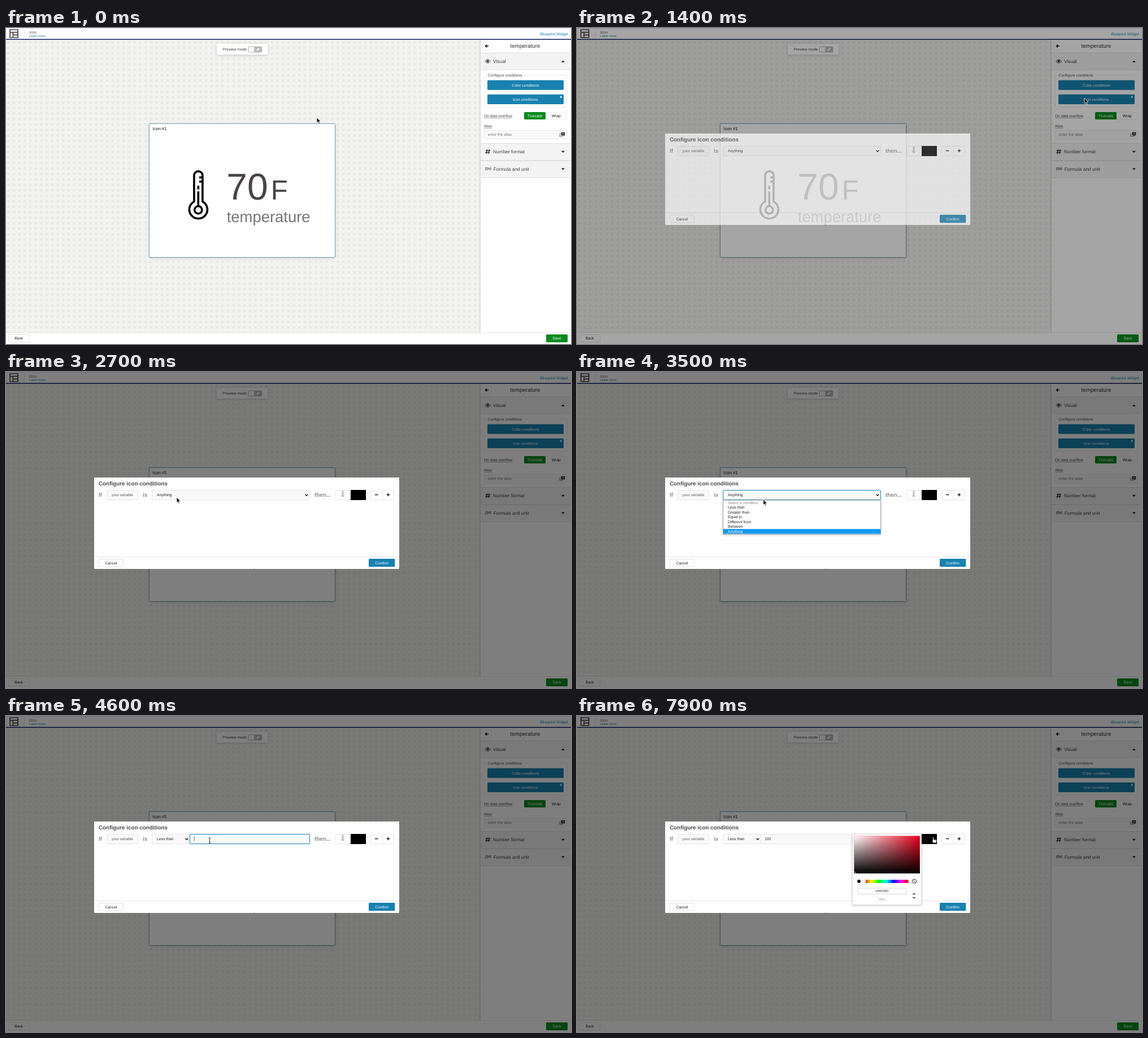
These frames come from a looping animation (1000x560 px, 8 s). An HTML page:

```html
<!DOCTYPE html>
<html lang="en">
<head>
<meta charset="utf-8">
<title>Icon conditions</title>
<style>
html, body { margin: 0; width: 100%; height: 100%; overflow: hidden; background: #fefefe; }
svg { display: block; width: 1000px; height: 560px; }
text { font-family: "Liberation Sans", Arial, sans-serif; text-rendering: geometricPrecision; white-space: pre; }
.soft { filter: drop-shadow(0 1px 2px rgba(0, 0, 0, .2)); }
</style>
</head>
<body>
<svg id="stage" viewBox="0 0 1000 560" xmlns="http://www.w3.org/2000/svg"></svg>
<script>
const BLUE = '#1881b0', GREEN = '#0a8a1e', WHITE = '#fefefe', LINE = '#e6e6e6', FIELD = '#f9f9f9', DARK = '#444';

const rect = (x, y, w, h, fill, stroke = 'none', rx = 0, more = '') =>
  `<rect x="${x}" y="${y}" width="${w}" height="${h}" fill="${fill}" stroke="${stroke}" rx="${rx}" ${more}/>`;
const text = (x, y, str, size = 6.8, fill = '#333', more = '') =>
  `<text x="${x}" y="${y}" font-size="${size}" fill="${fill}" ${more}>${str}</text>`;
const mid = (x, y, str, size, fill) => text(x, y, str, size, fill, 'text-anchor="middle"');
const bold = (x, y, str, fill) => text(x, y, str, 9.85, fill, 'font-weight="bold"');
const path = (d, stroke, width = 1, fill = 'none', more = '') =>
  `<path d="${d}" stroke="${stroke}" stroke-width="${width}" fill="${fill}" ${more}/>`;
const circle = (x, y, r, fill, more = '') => `<circle cx="${x}" cy="${y}" r="${r}" fill="${fill}" ${more}/>`;
const group = (id, body, more = '') => `<g id="${id}" ${more}>${body}</g>`;
const button = (x, y, w, h, label, fill = WHITE, color = '#222', stroke = 'none') =>
  rect(x, y, w, h, fill, stroke, 1.5) + mid(x + w / 2, y + h / 2 + 2.4, label, 6.75, color);
const caretDown = y => path(`M982.7 ${y}h6.2l-3.1 3.3z`, 'none', 0, '#222');
const chevron = x => path(`M${x - 2.3} 216.8l2.3 2.4 2.3-2.4`, '#111', 1.4);

const defs = `<defs>
  <pattern id="dots" width="9.72" height="9.72" patternUnits="userSpaceOnUse" y="21">
    ${rect(0, 0, 9.72, 9.72, '#f3f3f2')}${rect(1.6, 2, 5, 4.6, '#e9e9e8', 'none', 1.4)}
  </pattern>
  <linearGradient id="tint"><stop stop-color="#fff"/><stop offset="1" stop-color="#fff" stop-opacity="0"/></linearGradient>
  <linearGradient id="shade" x2="0" y2="1"><stop stop-opacity="0"/><stop offset="1"/></linearGradient>
  <linearGradient id="hues">${[0, 60, 120, 180, 240, 300, 360].map((h, i) =>
    `<stop offset="${i / 6}" stop-color="hsl(${h},95%,50%)"/>`).join('')}</linearGradient>
  <g id="thermo" fill="none" stroke="currentColor" stroke-width="3.6">
    <path d="M332.9 307.6V261.4a7.5 7.5 0 0 1 15 0V307.6A16 16 0 1 1 332.9 307.6z"/>
    <circle cx="340.3" cy="322.4" r="6.6"/>
    <path d="M340.3 289.5V316M340.3 279.5V286M342 264.7h6M342 272.2h6"/>
  </g>
</defs>`;

const header = rect(0, 0, 1000, 20, WHITE) + rect(0, 0, 1000, 1, '#e4e3e0') + rect(0, 19.4, 1000, 1.6, '#1d2a6b') +
  path('M7 3h14v14h-14zM7 7.6h14M12.4 7.6V17M12.4 12.3H21', DARK, 1.7) +
  rect(32.3, 2.5, .8, 16, '#ddd') + text(41, 9.8, 'Icon', 6.9, '#555') +
  text(41, 15.8, 'Learn more', 5.67, BLUE) + text(995, 13, 'Blueprint Widget', 6.8, BLUE, 'text-anchor="end"');

const board = rect(0, 21, 840, 519, 'url(#dots)') +
  rect(373, 28, 90.5, 19.3, WHITE, 'none', 1, 'class="soft"') + text(383.3, 40.3, 'Preview mode', 6.8, DARK) +
  rect(429, 33.3, 23.6, 9.5, '#bdbdbd', '#aaa', 1) + rect(429.6, 33.8, 9.4, 8.5, WHITE) +
  path('M443.2 40.4l.6-2 3.6-3.2 1.5 1.5-3.6 3.2z', 'none', 0, '#fff') +
  rect(253.5, 169.5, 329, 237, WHITE, 'none', 1, 'class="soft"') +
  rect(253.5, 169.5, 329, 237, 'none', '#2a7390', 1, 'stroke-width=".9" stroke-dasharray="2 1"') +
  text(259.6, 180.5, 'Icon #1', 7.6, '#111') + '<use href="#thermo" color="#000"/>' +
  text(390.3, 304, '70', 66, '#4a4444') + text(468.8, 303.5, 'F', 49, '#4a4444') +
  text(390.7, 343.6, 'temperature', 27.45, '#757575');

const panel = y => rect(840, y, 158.5, 30.5, '#f3f3f3') + path(`M840 ${y + .5}h158.5M840 ${y + 30.5}h158.5`, '#dcdcdc', .8);
const sidebar = rect(840, 21, 160, 519, WHITE, 'none', 0, 'class="soft"') +
  rect(843.5, 24.5, 15, 15, WHITE, '#eee', 1) + path('M854 32h-5M851 29.4L848.4 32l2.6 2.6', '#111', 1.4) +
  mid(919, 35.4, 'temperature', 9.8, '#333') +
  panel(43.5) + panel(204) + panel(235) +
  path('M847.8 59q4.7-6.6 9.6 0q-4.9 6.6-9.6 0z', '#444', 1) + circle(852.6, 58.8, 2.3, '#444') +
  text(862, 62, 'Visual', 8.4, DARK) + path('M982.7 60.7h6.2l-3.1-3.3z', 'none', 0, '#222') +
  path('M851.5 214.8l-1.3 8.4M855.2 214.8l-1.3 8.4M848.6 217.4h8.8M848 220.7h8.8', '#333', 1.3) +
  text(862, 222, 'Number format', 8.4, DARK) + caretDown(217.7) +
  text(847.6, 251.3, 'ƒ(x)', 6.2, '#333', 'font-style="italic" font-weight="bold"') +
  text(862.7, 252.6, 'Formula and unit', 8.4, DARK) + caretDown(248.4) +
  rect(846.5, 83.5, 146, 56.5, 'none', '#eee', 1) + rect(851, 82, 65, 4, WHITE) +
  text(852.7, 85.8, 'Configure conditions', 6.7, DARK) +
  button(852, 92.6, 135, 17.2, 'Color conditions', BLUE, '#fff') +
  group('hover', rect(852, 117.7, 135, 17.2, 'currentColor', 'none', 1.5)) + mid(919.3, 128.7, 'Icon conditions', 6.7, '#fff') +
  rect(980.7, 120.8, 3, 3, '#e8f4fa', 'none', 1) +
  text(845.9, 157.7, 'On data overflow', 6.65, DARK) + path('M846 159.5h50.5M846 177.7h14.5', '#888', .7) +
  rect(917.5, 149.5, 75, 12.5, WHITE, '#eee', 1) + button(917, 149, 38, 13, 'Truncate', GREEN, '#fff') +
  mid(973.8, 157.9, 'Wrap', 6.75, '#111') + text(845.9, 176, 'Alias', 6.65, DARK) +
  rect(846.5, 181.5, 146, 15.5, FIELD, '#ececec', 1) + text(852.7, 191.4, 'enter the alias', 6.8, '#777') +
  rect(979.8, 187.4, 5.4, 5, WHITE, '#555', .5, 'stroke-width=".7"') + rect(982.7, 184.8, 6.4, 5.6, '#333', 'none', .5) +
  path('M984.6 189l1.4-3 1.4 3', '#fff', .6) + path('M981 191.3l1.4-2.4', '#333', .6);

const footer = rect(0, 540, 1000, 20, WHITE) + rect(0, 539.5, 1000, .8, '#e2e2e2') +
  button(4.5, 543.5, 36.5, 13, 'Back', WHITE, '#222', '#e2e2e2') + button(956, 543, 38, 14, 'Save', GREEN, '#fff');

const dialog = rect(156, 187, 540, 162, WHITE, 'none', 1) + bold(164, 201.2, 'Configure icon conditions', '#4a4a4a') +
  bold(164, 221.2, 'If', '#8a8a8a') + bold(242, 221.2, 'is', '#8a8a8a') + bold(546, 221.2, 'then...', '#8a8a8a') +
  rect(178.5, 209.5, 55, 17, FIELD, LINE, 1) + mid(206, 220.2, 'your variable', 6.7, '#555') +
  '<g id="fields"></g>' +
  rect(583.5, 209.5, 27, 17, WHITE, LINE, 1) +
  '<use href="#thermo" color="#666" transform="translate(551.7 177.5) scale(.13)"/>' + rect(610, 209, 27, 18, '#000') +
  rect(645.5, 209.5, 41, 17, WHITE, LINE, 1) + rect(666, 209.5, .8, 17, LINE) +
  path('M653 217.5h5.6M673.6 217.5h5.6M676.4 214.7v5.6', '#222', 1.5) +
  rect(156, 327, 540, .8, '#e2e2e2') +
  button(164.5, 331.5, 43, 13.5, 'Cancel', WHITE, '#222', '#e2e2e2') + button(642, 331, 46.3, 14.3, 'Confirm', BLUE, '#fff');

const picker = rect(487.7, 209.5, 121.6, 125, WHITE, '#ddd', 1.5, 'class="soft"') +
  ['#e8001c', 'url(#tint)', 'url(#shade)'].map(f => rect(490.5, 212.5, 116.3, 66.5, f)).join('') +
  path('M490.5 276.4a2.6 2.6 0 0 1 2.6 2.6', '#fff', .8) +
  circle(499, 293, 2.9, '#000') + rect(508, 290.2, 78.7, 5.8, 'url(#hues)', 'none', 1) +
  circle(508, 293.1, 3.3, '#f8f8f8', 'class="soft"') +
  circle(597, 293, 3.8, 'none', 'stroke="#333" stroke-width="1"') + path('M594.3 290.3l5.4 5.4', '#333', 1) +
  rect(496.7, 305.2, 86.6, 10.2, WHITE, '#d0d0d0', 1, 'stroke-width=".8"') + mid(540, 312.3, '#000000', 5.9, '#333') +
  mid(540, 327.3, 'HEX', 5.8, '#999') + path('M594.2 316.6l2.2-2.2 2.2 2.2M594.2 320.8l2.2 2.2 2.2-2.2', '#222', 1.1);

const pointers = {
  arrow: path('M0 0V9.6L2.2 7.6 3.8 11.2 5.4 10.5 3.9 7H6.9z', '#fff', .7, '#111'),
  hand: path('M1.6 1q.9-1.3 1.8 0v3.4l4 .8q1.2.4 1 1.7l-.8 4.2h-4.6l-3.2-4q.3-1 1.8.2z', '#111', .8, '#fff') +
    path('M5 5v1.6M6.6 5.3v1.5', '#111', .5),
  beam: path('M-2-5h1.4l.6.6.6-.6h1.4M0-4.4v8.8M-2 5h1.4l.6-.6.6.6h1.4M-1 1.6h2', '#222', .9)
};

const stage = document.getElementById('stage');
stage.innerHTML = defs + header + board + sidebar + footer +
  rect(0, 0, 1000, 560, '#000', 'none', 0, 'id="dim"') + group('dialog', dialog) + group('picker', picker) +
  Object.entries(pointers).map(([id, body]) => group(id, body)).join('');
const el = id => document.getElementById(id);

const options = ['Select a condition', 'Less than', 'Greater than', 'Equal to', 'Different from', 'Between', 'Anything'];

function menu(chosen) {
  return rect(258.5, 227, 279, 60.5, WHITE, '#8a8f93', 0, 'class="soft" stroke-width=".8"') +
    rect(259, 278.2 - (6 - chosen) * 8.5, 278, 8.4, '#1199ee') +
    options.map((o, i) => text(267, 233.6 + i * 8.5, o, 6.8, i === chosen ? '#fff' : i ? '#222' : '#888')).join('');
}

function fields(t) {
  const open = t >= 2800 && t < 4000, narrow = t >= 4000, focus = t >= 4600 && t < 7800;
  const w = narrow ? 67 : 279;
  let out = rect(258.5, 209.5, w, 17, FIELD, open ? BLUE : LINE, 1) +
    text(267, 220.2, narrow ? 'Less than' : 'Anything', 6.8, '#222') + chevron(narrow ? 320 : 532);
  if (narrow) {
    const typed = '100'.slice(0, t < 5700 ? 0 : t < 6200 ? 1 : t < 6300 ? 2 : 3);
    out += rect(325.5, 209.5, 212, 17, FIELD, focus ? BLUE : LINE, 1.5) + text(332, 220.2, typed, 6.8, '#222');
    if (focus) out += rect(332.7 + typed.length * 3.78, 213.5, .7, 8, '#222');
  }
  return out + (open ? menu(t < 3600 ? 6 : 1) : '');
}

// Pointer route: time, x, y
const route = [
  [0, 550, 158.5], [100, 595, 162.5], [200, 595, 162.5], [600, 872, 142], [700, 872, 142], [1000, 897, 124.5],
  [1300, 897, 124.5], [1400, 898, 124], [1500, 733, 131.5], [1600, 628, 147], [1700, 571, 159.5], [1800, 571, 159.5],
  [2100, 447, 211], [2200, 447, 211], [2500, 301, 226], [2600, 301, 226], [2800, 303, 218], [3500, 329.7, 226],
  [3700, 312, 238], [3900, 312, 238], [4600, 360.5, 221], [6700, 360.5, 221], [6900, 540, 204], [7100, 792, 266],
  [7200, 792, 266], [7700, 628, 214], [8000, 628, 214]
];

function pointerAt(t) {
  const i = route.findIndex((k, n) => n && t <= k[0]);
  const [t0, x0, y0] = route[i - 1], [t1, x1, y1] = route[i];
  const k = (t - t0) / (t1 - t0), e = k * k * (3 - 2 * k);
  return [x0 + (x1 - x0) * e, y0 + (y1 - y0) * e];
}

function draw(now) {
  const t = Math.floor(now % 8000 / 100) * 100;
  const shown = Math.min(1, Math.max(0, (t - 1300) / 142));
  el('dim').setAttribute('opacity', shown / 2);
  el('dialog').setAttribute('opacity', shown);
  el('fields').innerHTML = fields(t);
  el('picker').style.display = t >= 7800 ? '' : 'none';

  const [x, y] = pointerAt(t);
  const onButton = t < 1400 && x > 852 && y > 117 && y < 135;
  const inField = t >= 4000 && x > 325 && x < 538 && y > 209 && y < 227;
  const kind = onButton || t >= 7700 ? 'hand' : inField ? 'beam' : 'arrow';
  el('hover').setAttribute('color', onButton ? '#17678c' : BLUE);
  for (const id in pointers) {
    el(id).style.display = id === kind ? '' : 'none';
    el(id).setAttribute('transform', `translate(${x} ${y})`);
  }
}

const start = performance.now();
function loop() {
  draw(performance.now() - start);
  requestAnimationFrame(loop);
}
loop();
</script>
</body>
</html>
```
